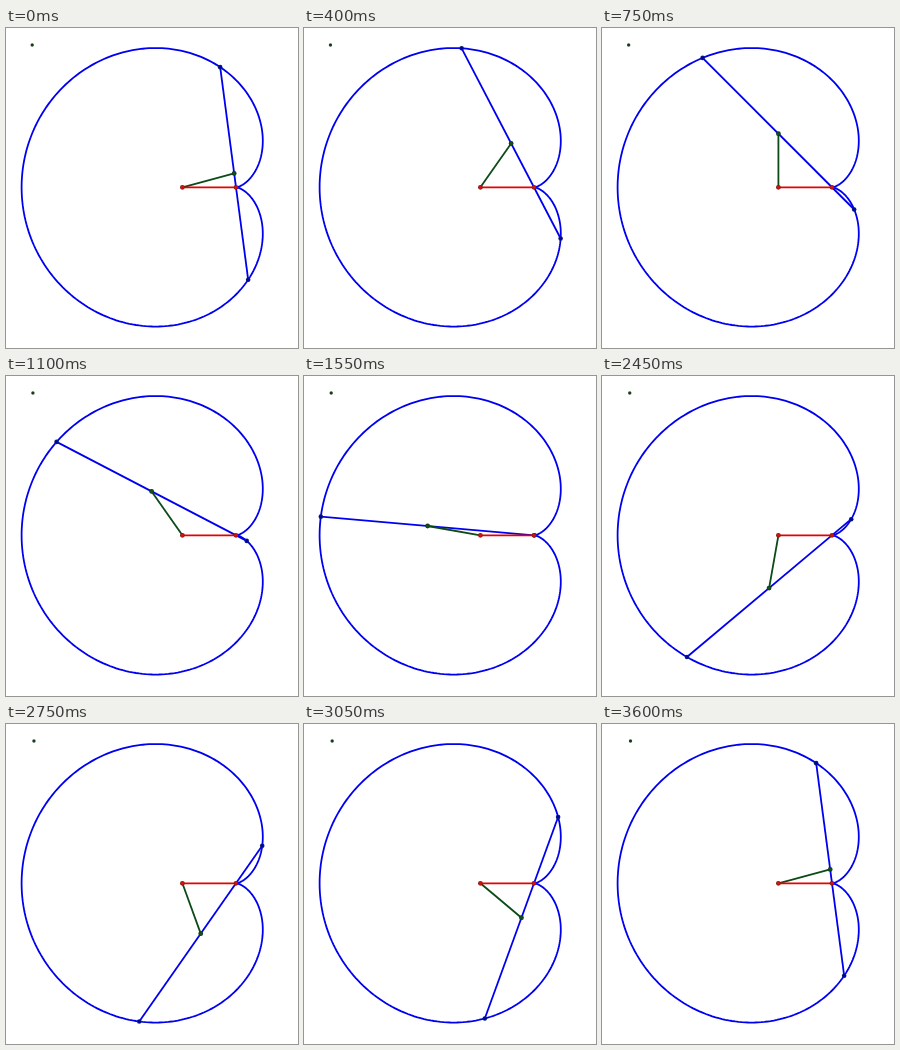
Animation of 292 by 320 pixels, one loop 3650 ms. Source, as an HTML page with a canvas:

```html
<!DOCTYPE html>
<html lang="en">
<head>
<meta charset="utf-8">
<title>Cardioid chord</title>
<style>
  html, body { margin: 0; width: 100%; height: 100%; overflow: hidden; background: #fff; }
  canvas { display: block; }
</style>
</head>
<body>
<canvas id="stage" width="292" height="320"></canvas>
<script>
const ctx = document.getElementById('stage').getContext('2d');
const STEP = 50, STEPS = 73;
const A = 107.2;                       // half the chord length
const cusp = [230, 159.3];
const center = [cusp[0] - A / 2, cusp[1]];
const BLUE = '#0000f0', RED = '#e60000', GREEN = '#0c4a18';

const polar = ([x, y], r, angle) => [x + r * Math.cos(angle), y - r * Math.sin(angle)];

function line(p, q, color) {
  ctx.strokeStyle = color;
  ctx.beginPath();
  ctx.moveTo(...p);
  ctx.lineTo(...q);
  ctx.stroke();
}

function dot(p, radius, fill, edge) {
  ctx.beginPath();
  ctx.arc(...p, radius, 0, 2 * Math.PI);
  ctx.fillStyle = edge;
  ctx.fill();
  ctx.beginPath();
  ctx.arc(...p, radius * 0.65, 0, 2 * Math.PI);
  ctx.fillStyle = fill;
  ctx.fill();
}

const cardioid = new Path2D();
for (let deg = 0; deg <= 360; deg++) {
  const t = deg * Math.PI / 180;
  cardioid.lineTo(...polar(cusp, A * (1 - Math.cos(t)), t));
}

function draw(step) {
  const angle = (15 + 5 * step) * Math.PI / 180;
  const tilt = (angle + Math.PI) / 2;
  const mid = polar(center, A / 2, angle);
  const ends = [polar(mid, A, tilt), polar(mid, -A, tilt)];

  ctx.fillStyle = '#fff';
  ctx.fillRect(0, 0, 292, 320);
  ctx.lineWidth = 1.8;
  ctx.strokeStyle = BLUE;
  ctx.stroke(cardioid);
  line(...ends, BLUE);
  line(center, mid, GREEN);
  line(center, cusp, RED);

  for (const end of ends) dot(end, 2.3, '#0000b0', '#082070');
  dot(mid, 2.4, '#14501c', '#123a20');
  dot(center, 2.4, '#d81010', '#8a1c10');
  dot(cusp, 2.4, '#d81010', '#8a1c10');
  dot([26.2 + 2.3 * step / (STEPS - 1), 17], 1.7, '#143c18', '#2a4a2c');
}

function tick() {
  draw(Math.floor(performance.now() / STEP) % STEPS);
  requestAnimationFrame(tick);
}
tick();
</script>
</body>
</html>
```
